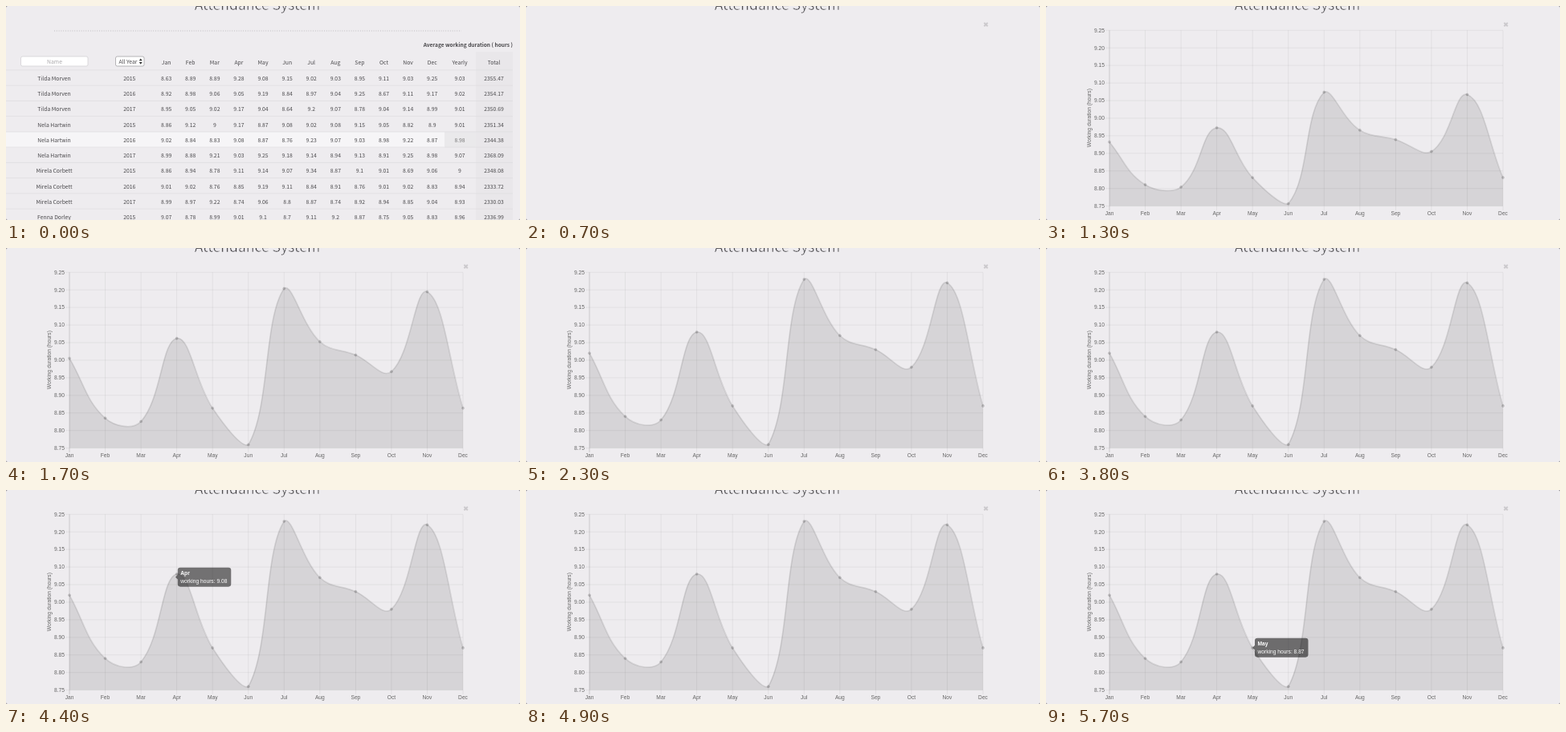
Write an HTML page that moves like this. It is 640x267 px and loops after 5.8 s.

```html
<!DOCTYPE html>
<html lang="en">
<head>
<meta charset="utf-8">
<title>Attendance System</title>
<style>
  html, body { margin: 0; width: 100%; height: 100%; overflow: hidden; background: #8b898c; }
  svg { display: block; width: 100vw; height: 100vh; }
  text { font: 6.82px "Noto Sans CJK JP", "Noto Sans CJK SC", "Noto Sans CJK", "Open Sans", sans-serif; fill: #4a494c; }
  .mid { text-anchor: middle; }
  .end { text-anchor: end; }
  /* A background-coloured outline thins the letters */
  #title { font-size: 17.55px; fill: #363538; stroke: #eeecef; stroke-width: .55; }
  #caption { font-size: 6.57px; font-weight: 700; fill: #49484b; }
  #chart text { font: 6.67px "Liberation Sans", Arial, sans-serif; fill: #666; }
  #tip text { fill: #fff; }
  #chart .bold { font-weight: 700; }
  .grid { stroke: #000; stroke-opacity: .1; stroke-width: .556; }
  .axis { stroke-opacity: .27; }
  .rule { stroke: #dddbde; stroke-width: .7; }
  .field { fill: #fff; stroke: #cfcdd0; stroke-width: .7; }
  .dot { fill: #000; fill-opacity: .17; stroke: #000; stroke-opacity: .1; stroke-width: .556; }
</style>
</head>
<body>
<svg viewBox="0 0 640 267">
  <rect width="640" height="267" rx="2.5" fill="#eeecef"/>
  <text id="title" class="mid" x="313" y="5">Attendance System</text>

  <g id="table">
    <path d="M60 31H567" stroke="#b9b7ba" stroke-dasharray="1 1.8" stroke-width=".9"/>
    <text id="caption" class="end" x="631" y="50.7">Average working duration ( hours )</text>
    <rect x="585" y="57" width="46" height="210" fill="#e9e7ea"/>
    <rect x="0" y="157.2" width="546" height="19.2" fill="#f6f5f7"/>
    <rect id="cell" x="546" y="157.2" width="39" height="19.2"/>
    <rect class="field" x="18.5" y="63" width="83.5" height="12" rx="2"/>
    <text class="mid" x="60.5" y="71.8" style="fill:#aaa8ab">Name</text>
    <rect class="field" x="136.5" y="63" width="35.5" height="12" rx="2" style="stroke:#9a989b"/>
    <text x="140.5" y="71.8">All Year</text>
    <path d="M165.7 68.3h4l-2-2.8zM165.7 69.9h4l-2 2.8z" fill="#333"/>
  </g>

  <path id="close" d="M570.4 20.9l4.4 4.4m0-4.4l-4.4 4.4" stroke="#cbc9cc" stroke-width="2"/>

  <g id="chart">
    <g id="axes"></g>
    <path id="area" fill="#000" fill-opacity=".1"/>
    <path id="line" fill="none" stroke="#000" stroke-opacity=".1" stroke-width="1.67"/>
    <g id="dots"></g>
    <g id="tip">
      <path d="M0 -2.8L-2.8 0L0 2.8V8.7Q0 12 3.3 12H63.2Q66.5 12 66.5 8.7V-8.7Q66.5 -12 63.2 -12H3.3Q0 -12 0 -8.7Z" fill="#000" fill-opacity=".54"/>
      <text id="tipMonth" class="bold" x="3.5" y="-2.6"></text>
      <text id="tipValue" x="3.5" y="7.4"></text>
    </g>
  </g>
</svg>
<script>
const LOOP = 5800, TICK = 100;
const $ = id => document.getElementById(id);

function add(parent, tag, attrs, text) {
  const el = document.createElementNS('http://www.w3.org/2000/svg', tag);
  for (const k in attrs) el.setAttribute(k, attrs[k]);
  if (text !== undefined) el.textContent = text;
  parent.appendChild(el);
  return el;
}
const seg = (parent, cls, x1, y1, x2, y2) => add(parent, 'line', { class: cls, x1, y1, x2, y2 });
const label = (parent, cls, x, y, text) => add(parent, 'text', { class: cls, x, y }, text);
const clamp = (v, a = 0, b = 1) => Math.min(b, Math.max(a, v));
const mix = (a, b, p) => a + (b - a) * p;
const outQuart = p => 1 - (1 - clamp(p)) ** 4;
const round2 = v => +v.toFixed(2);

let seed = 2015;
const random = () => (seed = (seed * 16807) % 2147483647) / 2147483647;

// Table
const months = 'Jan Feb Mar Apr May Jun Jul Aug Sep Oct Nov Dec'.split(' ');
const people = ['Tilda Morven', 'Nela Hartwin', 'Mirela Corbett', 'Fenna Dorley'];
const hours = [9.02, 8.84, 8.83, 9.08, 8.87, 8.76, 9.23, 9.07, 9.03, 8.98, 9.22, 8.87];
const picked = 4, rowCount = 10, workDays = 260.97;
const monthHours = () => round2(9 + (random() + random() - 1) * 0.4);
const colX = i => i < 12 ? 199.6 + i * 30.1 : i === 12 ? 565 : 607.5;
const table = $('table');

[...months, 'Yearly', 'Total'].forEach((m, i) => label(table, 'mid', colX(i), 72.7, m));
for (let r = 0; r < rowCount; r++) {
  const top = 79.9 + r * 19.25, base = top + 12.9;
  const row = r === picked ? hours : months.map(monthHours);
  const mean = row.reduce((a, b) => a + b) / 12;
  seg(table, 'rule', 0, top, 631, top);
  label(table, 'mid', 60, base, people[Math.floor(r / 3)]);
  label(table, 'mid', 153.7, base, 2015 + r % 3);
  [...row, round2(mean), round2(mean * workDays)].forEach((v, i) => {
    const el = label(table, 'mid', colX(i), base, v);
    if (r === picked && i === 12) el.style.fill = '#777';
  });
}

// Chart
const L = 79, R = 569, T = 30.3, B = 249.6;
const px = i => mix(L, R, i / 11);
const py = v => mix(B, T, (v - 8.75) / 0.5);
const pts = hours.map((v, i) => ({ x: px(i), y: py(v) }));

const axes = $('axes');
for (let i = 0; i <= 10; i++) {
  const v = 8.75 + i * 0.05, y = py(v);
  seg(axes, 'grid', L - 5.5, y, R, y);
  label(axes, 'end', 73, y + 2.3, v.toFixed(2));
}
months.forEach((m, i) => {
  seg(axes, i ? 'grid' : 'grid axis', px(i), T, px(i), B + 5.5);
  label(axes, 'mid', px(i), 261.2, m);
});
add(axes, 'text', { class: 'mid', transform: 'translate(56 139.7) rotate(-90)' }, 'Working duration (hours)');
const dots = pts.map(p => add($('dots'), 'circle', { class: 'dot', cx: p.x, r: 1.67 }));

// Control points before and after each point, tension 0.4
const handles = pts.map((p, i) => {
  const a = pts[i - 1] || p, b = pts[i + 1] || p;
  const da = Math.hypot(p.x - a.x, p.y - a.y), db = Math.hypot(b.x - p.x, b.y - p.y);
  const at = k => ({
    x: clamp(p.x + k * (b.x - a.x), L, R),
    y: clamp(p.y + k * (b.y - a.y), T, B)
  });
  return { pre: at(-0.4 * da / (da + db)), post: at(0.4 * db / (da + db)) };
});

function drawCurve(grow) {
  const pos = p => p.x.toFixed(2) + ' ' + mix(B, p.y, grow).toFixed(2);
  let d = 'M' + pos(pts[0]);
  for (let i = 1; i < pts.length; i++)
    d += `C${pos(handles[i - 1].post)} ${pos(handles[i].pre)} ${pos(pts[i])}`;
  $('line').setAttribute('d', d);
  $('area').setAttribute('d', `${d}L${R} ${B}L${L} ${B}Z`);
  dots.forEach((el, i) => el.setAttribute('cy', mix(B, pts[i].y, grow)));
}

// Tooltip visits: each slides in from where the last one rested
const rest = i => ({ x: pts[i].x + 2.8, y: pts[i].y - 0.3 });
const visits = [
  { i: 2, from: { x: 45, y: 35 }, start: 2979, hide: 3710, fade: 90 },
  { i: 3, from: rest(2), start: 4260, hide: 4760, fade: 110 },
  { i: 4, from: rest(3), start: 5434, hide: LOOP, fade: 1 }
];

function drawTip(t) {
  const v = visits.find(v => t >= v.start && t < v.hide + v.fade);
  $('tip').style.display = v ? '' : 'none';
  if (!v) return;
  const p = outQuart((t - v.start) / 250), to = rest(v.i);
  $('tip').setAttribute('transform', `translate(${mix(v.from.x, to.x, p)} ${mix(v.from.y, to.y, p)})`);
  $('tip').style.opacity = p * (1 - clamp((t - v.hide) / v.fade));
  $('tipMonth').textContent = months[v.i];
  $('tipValue').textContent = 'working hours: ' + hours[v.i];
}

function draw(t) {
  const open = t >= 700, plotted = t >= 1000;
  table.style.display = open ? 'none' : '';
  $('close').style.display = open ? '' : 'none';
  $('chart').style.display = plotted ? '' : 'none';
  if (!open) {
    const shade = Math.round(mix(234, 221, clamp(t / 300)));
    $('cell').setAttribute('fill', `rgb(${shade},${shade - 1},${shade + 1})`);
  }
  if (plotted) {
    drawCurve(outQuart((t - 940) / 1470));
    drawTip(t);
  }
}

// The screen refreshes ten times a second
const began = performance.now();
let last = -1;
function run() {
  const t = Math.floor((performance.now() - began) % LOOP / TICK) * TICK;
  if (t !== last) draw(last = t);
  requestAnimationFrame(run);
}
run();
</script>
</body>
</html>
```
